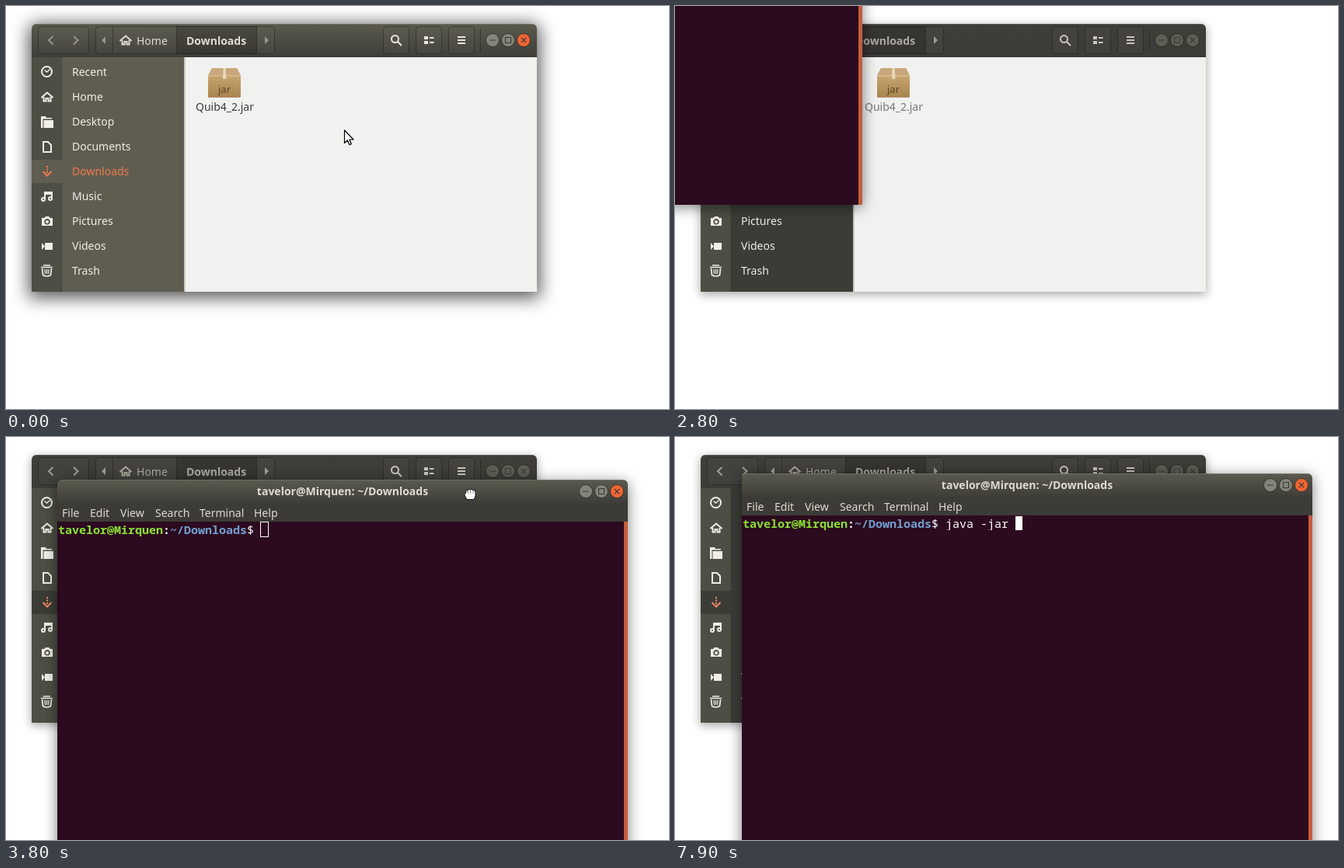
Write an HTML page that moves like this. It is 853x519 px and loops after 8000 ms.

```html
<!DOCTYPE html>
<html lang="en">
<head>
<meta charset="utf-8">
<title>Opening a terminal from a folder</title>
<style>
  html, body { margin: 0; width: 100%; height: 100%; overflow: hidden; background: #fff; }
  #stage { position: absolute; left: 0; top: 0; width: 853px; height: 519px; overflow: hidden; }
  #stage > *, svg { position: absolute; left: 0; top: 0; }
  svg { display: block; overflow: visible; }
  text { font: 14px "Noto Sans", "Open Sans", sans-serif; fill: currentColor; white-space: pre; }
  .bold { font-weight: 700; }
  .line { fill: none; stroke: currentColor; stroke-width: 2; }
  .solid { fill: currentColor; }

  .files, .menu, .hover, .term, .pen, .typed, .caret, .arrow, .hand, .grip, .beam {
    animation: 8s step-end infinite;
  }

  /* File manager */
  .files {
    --bar: linear-gradient(#5b5a4e, #4d4c43 50%, #3e3d38);
    --side: #5f5d50;
    --head: #dfdbd2;
    --icon: #e8e5dc;
    --dim: #98958a;
    --name: #3c3c3c;
    --accent: #f07b4c;
    --round: #85847a;
    --close: #ee6535;
    --mark: #3a3934;
    --shade: 0 4px 22px 4px rgba(0,0,0,.65);
    #stage > & { left: 33px; top: 23px; }
    width: 650px; height: 345px;
    border-radius: 6px 6px 0 0;
    background:
      var(--bar) 0 0 / 100% 43px no-repeat,
      linear-gradient(90deg, #4d4f44 38px, #45463d 38px 39px, var(--side) 39px 196px, #c9c8c3 196px 198px, #f1f1f0 198px);
    box-shadow: var(--shade);
    animation-name: blur;
  }
  @keyframes blur {
    28.75% {
      --bar: linear-gradient(#3f3e39, #3c3b37);
      --side: #3c3c37;
      --head: #aaa79d;
      --icon: #c9c6bd;
      --dim: #a19e94;
      --name: #777;
      --accent: #f08a66;
      --round: #5e5d54;
      --close: #5e5d54;
      --mark: #3c3b37;
      --shade: 0 3px 12px 1px rgba(0,0,0,.33);
    }
  }
  .button { fill: rgba(255,255,255,.025); stroke: rgba(20,20,15,.4); }
  .round { fill: var(--round); stroke: rgba(25,25,20,.6); }
  .close { fill: var(--close); }
  .mark { fill: none; stroke: var(--mark); stroke-width: 1.1; }

  /* Context menu */
  #stage > .menu { left: 431px; top: 156px; }
  .menu {
    width: 237px; height: 127px; overflow: hidden; opacity: 0;
    background: #3b3b36; box-shadow: 0 3px 10px rgba(0,0,0,.4);
    animation-name: menu;
  }
  @keyframes menu { 12.5% { opacity: 1; } 27.5% { opacity: 0; } }
  .hover { opacity: 0; animation-name: hover; }
  @keyframes hover {
    15%    { opacity: 1; transform: translateY(0); }
    17.5%  { opacity: 0; }
    18.75% { opacity: 1; transform: translateY(52px); }
    20%    { transform: translateY(78px); }
    22.5%  { opacity: 1; transform: translateY(104px); }
  }

  /* Terminal */
  .term {
    --round: #85847a;
    --close: #ee6535;
    --mark: #3a3934;
    width: 734px; height: 488px; opacity: 0;
    border-radius: 6px 6px 0 0; overflow: hidden;
    transform: translate(-493px, -232px);
    background:
      linear-gradient(#5b5a4e, #3e3d38) 0 0 / 100% 30px no-repeat,
      linear-gradient(#3c3b37 54px, transparent 0),
      linear-gradient(90deg, #2c0a1f 729px, #c65d3f 0);
    box-shadow: 0 3px 18px rgba(0,0,0,.5);
    animation-name: drag, open;
  }
  @keyframes open { 30% { opacity: 1; } }
  @keyframes drag {
    0%     { transform: translate(-493px, -232px); }
    41.25% { transform: translate(-440px, -190px); }
    42.5%  { transform: translate(-285px, -70px); }
    43.75% { transform: translate(-131px, 25px); }
    45%    { transform: translate(-39px, 58px); }
    46.25% { transform: translate(28px, 61px); }
    47.5%  { transform: translate(66px, 55px); }
    48.75% { transform: translate(82px, 49px); }
    50%    { transform: translate(86px, 47px); }
  }
  pre {
    position: absolute; left: 1px; top: 55px; margin: 0; display: flex; height: 18px;
    font: 15px/18px "Noto Sans Mono", "DejaVu Sans Mono", monospace; color: #fff;
  }
  pre b { color: #8ae234; }
  pre b + b { color: #fff; }
  pre b + b + b { color: #729fcf; }
  .pen { --n: 0; display: flex; animation-name: type; }
  .typed { width: calc(var(--n) * 9px); overflow: hidden; }
  @keyframes type {
    66.25% { --n: 1; }
    67.5%  { --n: 2; }
    70%    { --n: 3; }
    71.25% { --n: 4; }
    73.75% { --n: 5; }
    88.75% { --n: 6; }
    91.25% { --n: 7; }
    93.75% { --n: 8; }
    96.25% { --n: 9; }
    98.75% { --n: 10; }
  }
  .caret { width: 9px; height: 18px; outline: 1px solid #fff; animation-name: caret; }
  @keyframes caret {
    52.5%  { background: #fff; outline-color: transparent; opacity: 1; }
    61.25% { opacity: 0; }
    66.25% { opacity: 1; }
    81.25% { opacity: 0; }
    88.75% { opacity: 1; }
  }

  /* Mouse pointers */
  .arrow { transform: translate(435px, 160px); animation-name: arrow; }
  @keyframes arrow {
    8.75%  { transform: translate(432px, 156px); }
    10%    { transform: translate(430px, 154px); }
    15%    { transform: translate(431px, 161px); }
    16.25% { transform: translate(437px, 178px); }
    17.5%  { transform: translate(447px, 198px); }
    18.75% { transform: translate(459px, 222px); }
    20%    { transform: translate(470px, 243px); }
    21.25% { transform: translate(480px, 256px); }
    22.5%  { transform: translate(487px, 263px); }
    23.75% { transform: translate(497px, 266px); }
    33.75% { transform: translate(322px, 31px); }
    35%    { opacity: 0; }
  }
  /* The hand trails the window by a tenth of a second. */
  .hand { animation-name: drag; animation-delay: .1s; }
  .grip { opacity: 0; animation-name: grip; }
  @keyframes grip { 41.25% { opacity: 1; } 55% { opacity: 0; } }
  .beam { opacity: 0; animation-name: beam; }
  @keyframes beam {
    55%    { opacity: 1; transform: translate(638.5px, 88px); }
    56.25% { transform: translate(614.5px, 142px); }
    57.5%  { transform: translate(593.5px, 181px); }
    66.25% { opacity: 0; }
  }
</style>
</head>
<body>
<div id="stage">

  <div class="files">
    <svg width="650" height="345" viewBox="33 23 650 345">
      <defs>
        <linearGradient id="card" x2="0" y2="1">
          <stop stop-color="#d2b07c"/><stop offset="1" stop-color="#a8854f"/>
        </linearGradient>
        <linearGradient id="glow" x2="0" y2="1">
          <stop stop-color="#f58653"/><stop offset="1" stop-color="#e3642f"/>
        </linearGradient>
        <g id="house">
          <path class="line" d="M-7.5 1 0-5.5 7.5 1"/>
          <path class="line" d="M-4.5 0V5.5H-1.5V2H1.5V5.5H4.5V0"/>
        </g>
        <g id="controls">
          <circle class="round" r="8.5"/>
          <circle class="round" cx="20" r="8.5"/>
          <circle class="round close" cx="40" r="8.5"/>
          <path class="mark" d="M-4 0H4M16.5-3.5h7v7h-7zM37-3l6 6m0-6-6 6"/>
        </g>
      </defs>

      <path d="M38 23.5H678" stroke="#fff" stroke-opacity=".13"/>
      <g class="button">
        <rect x="41.5" y="26.5" width="65" height="35" rx="4"/>
        <rect x="115.5" y="26.5" width="230" height="35" rx="4"/>
        <rect x="485.5" y="26.5" width="33" height="35" rx="4"/>
        <rect x="527.5" y="26.5" width="33" height="35" rx="4"/>
        <rect x="569.5" y="26.5" width="33" height="35" rx="4"/>
        <path d="M137.5 27V61M610.5 30V58"/>
        <rect x="219.5" y="26.5" width="103" height="35" style="fill:rgba(0,0,0,.2)"/>
      </g>
      <g style="color:var(--dim)">
        <path class="line" d="M60.500 39 55 44l5.500 5.500M87 39l5.500 5-5.500 5.500"/>
        <path class="solid" d="M128 39v10l-5-5zM333 39v10l5-5z"/>
      </g>
      <g style="color:var(--head)">
        <use href="#house" x="154" y="44"/>
        <text x="168" y="50">Home</text>
        <text class="bold" x="232" y="50">Downloads</text>
      </g>
      <g style="color:var(--icon)">
        <circle class="line" cx="500.500" cy="42.500" r="4.500"/>
        <path class="line" d="M504 46l5 5M581 40h10M581 44h10M581 48h10M545 41h5.500M545 47h5.500"/>
        <path class="solid" d="M538 39h5v4h-5zM538 45h5v4h-5z"/>
      </g>
      <use href="#controls" x="626" y="44"/>

      <rect x="33" y="198" width="39" height="30" style="fill:var(--side)"/>
      <g style="color:#f0eee8">
        <circle class="line" cx="52.500" cy="84.500" r="6.500"/>
        <path class="line" style="stroke-width:1.400" d="M49.500 82.500l3 2.500 4-3.500"/>
        <use href="#house" x="53" y="117"/>
        <path class="solid" d="M45 142h6l1 2h7v1.500H47.500V157H45zM48.500 147H61v10H48.500z"/>
        <path class="line" d="M48 175h6l4 4v9H48z"/>
        <path class="line" d="M50 249v-9h9v8M50 242h9"/>
        <circle class="line" cx="48" cy="249" r="2"/>
        <circle class="line" cx="57" cy="248" r="2"/>
        <path class="solid" fill-rule="evenodd" d="M46 273h3l2-2h4l2 2h3v10H46zM53 274a3.800 3.800 0 1 0 .1 0z"/>
        <circle class="solid" cx="53" cy="278" r="2"/>
        <path class="solid" d="M50 305h10v9H50zM46 305v9l4-4.500z"/>
        <path class="line" style="stroke-width:1.700" d="M45 336.500h15M48 334h9M46.500 338l1 8.500q5 3 10 0l1-8.500"/>
        <path class="line" style="stroke-width:1.200" d="M50 339l.5 6M52.500 339v6M55 339l-.5 6"/>
        <text x="85" y="90">Recent<tspan x="85" dy="32">Home</tspan><tspan x="85" dy="32">Desktop</tspan><tspan x="85" dy="32">Documents</tspan><tspan x="85" dy="32" style="fill:var(--accent)">Downloads</tspan><tspan x="85" dy="32">Music</tspan><tspan x="85" dy="32">Pictures</tspan><tspan x="85" dy="32">Videos</tspan><tspan x="85" dy="32">Trash</tspan></text>
      </g>
      <g style="color:var(--accent)">
        <path class="line" d="M47.500 213l5.500 5.500 5.500-5.500"/>
        <path class="line" stroke-dasharray="2 1.500" d="M53 206v10"/>
      </g>

      <rect x="260" y="115" width="42" height="3" rx="1" fill="#b98b78"/>
      <path d="M265 80h32l5 10v27h-42V90z" fill="url(#card)"/>
      <path d="M265 80h32l5 9.500h-42z" fill="#c9a77c"/>
      <path d="M260 90h42" stroke="#e3c79b"/>
      <path d="M279.500 80h3l1 14h-4.500z" fill="#efe0c4" opacity=".85"/>
      <text x="281" y="112" text-anchor="middle" style="font-size:13px;fill:#5c4523">jar</text>
      <text x="281.500" y="135" text-anchor="middle" style="fill:var(--name)">Quib4_2.jar</text>
    </svg>
  </div>

  <div class="menu">
    <svg width="237" height="127" style="color:#e6e3db">
      <path d="M0 26h237M0 52h237M0 78h237M0 104h237" stroke="#34342f"/>
      <g class="hover">
        <rect width="237" height="26" fill="url(#glow)"/>
        <path d="M0 .5h237" stroke="#c8531f"/>
      </g>
      <text x="19" y="17">New Folder<tspan x="19" dy="26" fill="#82817a">Paste</tspan><tspan x="19" dy="26">Select All</tspan><tspan x="19" dy="26">Properties</tspan><tspan x="19" dy="26">Open in Terminal</tspan></text>
      <text x="229" y="17" text-anchor="end" style="fill:#8b8a82">Shift+Ctrl+N<tspan x="229" dy="26">Ctrl+V</tspan><tspan x="229" dy="26">Ctrl+A</tspan><tspan x="229" dy="26">Ctrl+I</tspan></text>
    </svg>
  </div>

  <div class="term">
    <svg width="734" height="488" style="color:#dfdbd2">
      <path d="M5 .5H729" stroke="#fff" stroke-opacity=".13"/>
      <text class="bold" x="367" y="20" text-anchor="middle">tavelor@Mirquen: ~/Downloads</text>
      <use href="#controls" x="680" y="15"/>
      <text y="48"><tspan x="6">File</tspan><tspan x="42">Edit</tspan><tspan x="81">View</tspan><tspan x="126">Search</tspan><tspan x="183">Terminal</tspan><tspan x="253">Help</tspan></text>
    </svg>
    <pre><b>tavelor@Mirquen</b><b>:</b><b>~/Downloads</b><span>$ </span><span class="pen"><span class="typed">java -jar </span><span class="caret"></span></span></pre>
  </div>

  <svg width="853" height="519" stroke-linejoin="round">
    <path class="arrow" d="M.5 0V16.500L4.300 13 6.800 18.700 9.300 17.600 6.800 12H12z" fill="#fff" stroke="#000" stroke-width="1.200"/>
    <g class="hand">
      <g class="grip">
        <path transform="translate(569 13)" d="M-5-2Q-6-6-3-5-2-7.500 0-6 2-7.500 4-5.500 7-6 7-3V2L5 6.500H-4L-7 1Q-7.500-2-5-2z" fill="#fff" stroke="#111"/>
        <path transform="translate(569 13)" d="M-2.500-4.500v3M.7-5v3.500M4-4.500v3" stroke="#555" stroke-width=".8"/>
      </g>
    </g>
    <g class="beam" fill="none">
      <path d="M-3-6.500H3M0-6.500V6.500M-3 6.500H3" stroke="#111" stroke-width="3"/>
      <path d="M-3-6.500H3M0-6.500V6.500M-3 6.500H3" stroke="#eee"/>
    </g>
  </svg>
</div>
</body>
</html>
```
